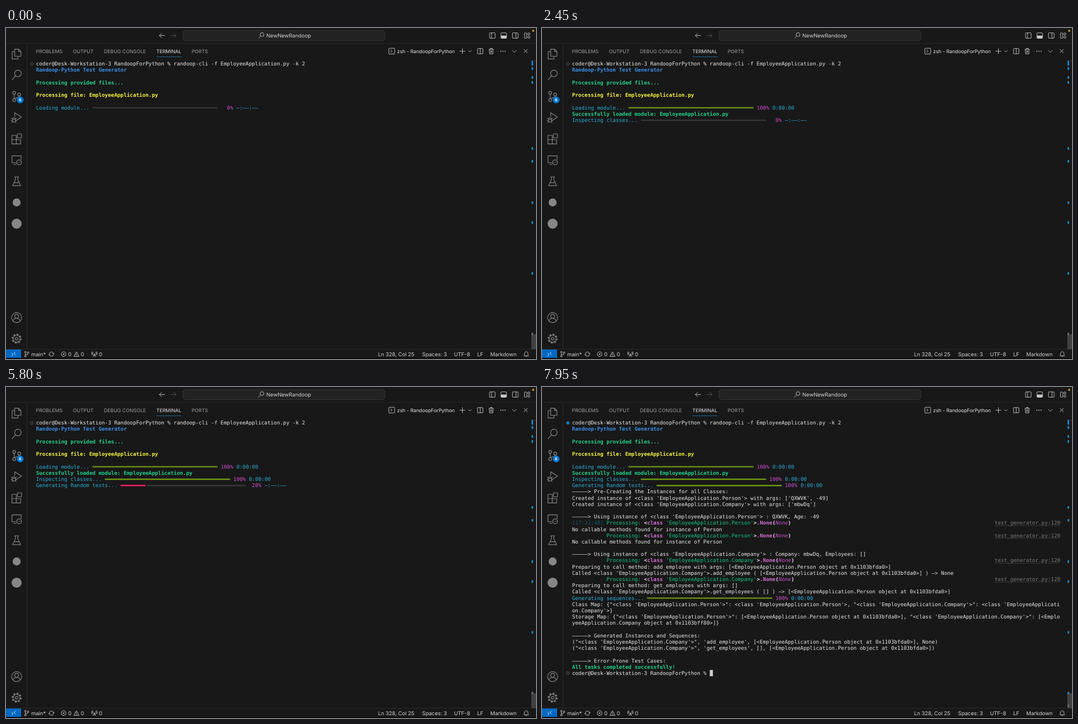
Animation, 947 px wide and 592 px high, one loop 8000 ms. Source, as an HTML page:

```html
<!DOCTYPE html>
<html lang="en">
<head>
<meta charset="utf-8">
<title>Terminal test run</title>
<style>
  html, body { margin: 0; width: 100%; height: 100%; overflow: hidden; background: #181818; }
  svg { display: block; width: 100%; height: 100%; }
  text { white-space: pre; text-rendering: geometricPrecision; }
  .ui { font: 9.45px Inter, "Open Sans", sans-serif; fill: #d4d4d4; }
  .tabs { font-size: 8.77px; fill: #a0a0a0; }
  .tabs .lit { fill: #e7e7e7; }
  .term { font: 9.29px "DejaVu Sans Mono", "Liberation Mono", monospace; fill: #e8e8e8; }
  .icon { fill: none; stroke: #cccccc; stroke-width: .9; stroke-linejoin: round; }
  .side { stroke: #868686; stroke-width: 1.15; }
  .b { font-weight: 700; }
  .blue { fill: #3b8eea; font-weight: 700; }
  .ok { fill: #23d18b; font-weight: 700; }
  .yellow { fill: #f5f543; font-weight: 700; }
  .green { fill: #10c982; }
  .cyan { fill: #2aaedb; }
  .dimcyan { fill: #1b566e; }
  .magenta { fill: #d250d2; }
  .call { fill: #d670d6; font-weight: 700; }
  .none { fill: #cc4ccc; font-style: italic; }
  .link { fill: #7a7a7a; }
</style>
</head>
<body>
<svg id="stage" viewBox="0 0 947 592" preserveAspectRatio="none">
  <rect width="947" height="592" fill="#181818"/>
  <path d="M0 27.5H947M37.5 27V575M0 574.5H947" stroke="#292929" fill="none"/>
  <rect y="575" width="27" height="16" fill="#0069c4"/>
  <rect y="590" width="947" height="2" fill="#0c0c0c"/>

  <!-- title bar -->
  <rect x="316" y="4.5" width="361" height="18" rx="4.5" fill="#222222" stroke="#3b3b3b" stroke-width=".9"/>
  <g class="icon">
    <path d="M284 13.5H274M278.2 9.3L274 13.5L278.2 17.7"/>
    <path d="M294 13.5H304M299.8 9.3L304 13.5L299.8 17.7" stroke="#555555"/>
    <circle cx="457.5" cy="11.8" r="3.4"/><path d="M455 14.3L451 18.4"/>
    <rect x="864" y="8.7" width="10" height="9.6" rx="1"/><path d="M867.6 9V18"/>
    <rect x="884.3" y="8.7" width="10" height="9.6" rx="1"/>
    <rect x="885" y="14" width="8.8" height="4" fill="#cccccc"/>
    <rect x="905" y="8.7" width="10" height="9.6" rx="1"/><path d="M911.2 9V18"/>
    <rect x="926.3" y="9" width="4" height="9.2" rx=".8"/>
    <rect x="932.5" y="9" width="3.4" height="3.4" rx=".6"/>
    <rect x="932.5" y="14.8" width="3.4" height="3.4" rx=".6"/>
  </g>
  <circle cx="942" cy="5" r="2" fill="#b78a26"/>
  <text class="ui" x="465" y="17">NewNewRandoop</text>

  <!-- panel header -->
  <g class="ui tabs">
    <text x="53.6" y="44.8">PROBLEMS</text>
    <text x="119.7" y="44.8">OUTPUT</text>
    <text x="175" y="44.8">DEBUG CONSOLE</text>
    <text x="268.8" y="44.8" class="lit">TERMINAL</text>
    <text x="331.7" y="44.8">PORTS</text>
    <text x="698.8" y="44.8" class="lit">zsh - RandoopForPython</text>
  </g>
  <rect x="268.5" y="51" width="45" height=".8" fill="#1f78b8"/>
  <g class="icon">
    <rect x="684" y="36.2" width="10.4" height="10.4" rx="1"/><path d="M687 38.8L690 41.4L687 44"/>
    <path d="M810.5 41.4H820.5M815.5 36.4V46.4M826 40.2L828.7 42.9L831.4 40.2"/>
    <rect x="842.5" y="36.8" width="9.6" height="9.4" rx=".6"/><path d="M847.3 37V46"/>
    <path d="M862.6 38.2H871.4M865.4 38V36.5H868.6V38M863.6 38.2L864.1 46.3H869.9L870.4 38.2M866 40V44.5M868 40V44.5"/>
    <path d="M904.6 39.8L908.3 43.5L912 39.8M925.4 38L932 44.6M932 38L925.4 44.6"/>
  </g>
  <g fill="#cccccc"><circle cx="884.2" cy="41.5" r=".9"/><circle cx="888" cy="41.5" r=".9"/><circle cx="891.8" cy="41.5" r=".9"/></g>

  <!-- activity bar -->
  <g class="icon side">
    <path d="M15.5 37.8H22.5L26.7 42V50.5H15.5ZM22.3 38V42.2H26.5M15.5 42H11V55.4H21.5V50.6"/>
    <circle cx="21.3" cy="81.3" r="5.9"/><path d="M17 85.6L10.6 92.8"/>
    <circle cx="14.6" cy="116" r="2.6"/><circle cx="14.6" cy="129" r="2.6"/><circle cx="23.6" cy="119" r="2.6"/>
    <path d="M14.6 118.6V126.4M23.6 121.6C23.6 125 20 124.6 16 125.6"/>
    <path d="M15.5 159V151.5L27.5 159.3L18.5 165.2"/>
    <ellipse cx="14.2" cy="164.6" rx="2.9" ry="3.9"/>
    <path d="M11.4 163.5H17M9.4 161L11.6 162.4M19 161L16.8 162.4M9 165.4H11.2M17.2 165.4H19.4M9.8 169L11.8 167.4M18.6 169L16.6 167.4"/>
    <path d="M10.6 192H18.4V207.4H10.6ZM10.6 199.7H26.1V207.4H18.4"/><rect x="20.4" y="189.2" width="7.3" height="7.3" rx=".7"/>
    <path d="M18.5 241H10.6V228.6H27V235.4M13.6 244H18.6"/><circle cx="23.4" cy="240.2" r="4.4"/>
    <path d="M21.2 239L22.6 240.4L21.2 241.8M25.6 238.6L24.2 240L25.6 241.4" stroke-width=".8"/>
    <path d="M14.8 266.2H23.2M16.7 266.4V272L11.8 281.8H26.2L21.3 272V266.4M14.4 276.6H23.6"/>
    <circle cx="19" cy="518" r="8.9"/><circle cx="19" cy="515.6" r="3.5"/><path d="M12.8 524.2C13.5 517.9 24.5 517.9 25.2 524.2"/>
    <circle cx="19" cy="555.7" r="7.6" stroke-width="2.5" stroke-dasharray="2.985"/>
    <circle cx="19" cy="555.7" r="6.2"/><circle cx="19" cy="555.7" r="2.4"/>
  </g>
  <circle cx="19" cy="312" r="7.2" fill="#868686"/>
  <circle cx="19" cy="350" r="9" fill="#868686"/>
  <circle cx="25.3" cy="128.7" r="6.1" fill="#0078d4"/>
  <text class="ui b" x="25.3" y="131.4" text-anchor="middle" style="font-size:7px;fill:#fff">6</text>

  <!-- status bar -->
  <g class="icon">
    <path d="M10 581.6L12.6 584.2L10 586.8M16.8 579.4L14.2 582L16.8 584.6" stroke="#ffffff"/>
    <circle cx="34.6" cy="579.6" r="1.4"/><circle cx="34.6" cy="587" r="1.4"/><circle cx="39.4" cy="580.8" r="1.4"/>
    <path d="M34.6 581V585.6M39.4 582.2C39.4 584.4 36.5 583.6 34.8 584.6"/>
    <path d="M77.4 583.5A3.9 3.9 0 0 1 84.8 581.6M85 583.1A3.9 3.9 0 0 1 77.7 585.2M83 582.2H86.6M75.8 584.4H79.2"/>
    <circle cx="103" cy="583.3" r="4.2"/><path d="M101.3 581.6L104.7 585M104.7 581.6L101.3 585"/>
    <path d="M125.8 579L130.3 587.3H121.3ZM125.8 582V584.6M125.8 585.4V586.3"/>
    <path d="M158 582.5L155.7 588M158 582.5L160.3 588M156.6 586H159.4M155.6 579.5Q154.2 581.8 155.6 584M160.4 579.5Q161.8 581.8 160.4 584M154 578.6Q151.8 581.8 154 585M162 578.6Q164.2 581.8 162 585"/>
    <path d="M925.6 586.3H933.6L932.6 584.4V582C932.6 578 926.6 578 926.6 582V584.4ZM928.4 587.4Q929.6 588.6 930.8 587.4"/>
  </g>
  <g class="ui">
    <text x="45" y="586.7">main*</text><text x="111" y="586.7">0</text>
    <text x="133.6" y="586.7">0</text><text x="166" y="586.7">0</text>
    <text x="664.7" y="586.7">Ln 328, Col 25</text><text x="743.6" y="586.7">Spaces: 3</text>
    <text x="800.4" y="586.7">UTF-8</text><text x="842" y="586.7">LF</text><text x="865.2" y="586.7">Markdown</text>
  </g>

  <!-- scroll ruler -->
  <rect x="938.7" y="547.5" width="8.3" height="27" fill="#414141"/>
  <g id="ruler"></g>
  <rect x="944" y="58.6" width="3" height="1.2" fill="#6e2a2a"/>

  <circle id="status" cx="46.2" cy="64.2" r="2.5" stroke-width=".9"/>
  <g id="term" class="term"></g>
</svg>
<script>
const LOOP = 8000;
const STEP = 505;      // work time of one fifth of a bar
const LAG = 110;       // delay until the next screen refresh shows it
const FIRST = -290, RUN = 2540;
const PRINT = FIRST + 3 * RUN, DONE = PRINT + 120;
const LEFT = 53.7, COL = 5.593, TOP = 64.1, ROW = 11.19;
const PENDING = "#626262", PASSED = "#1a7fbd";
const term = document.getElementById("term");
const statusDot = document.getElementById("status");
const timed = [], bars = [];

const colX = col => LEFT + col * COL;
const rowY = row => TOP + row * ROW;

function make(tag, attrs, parent, text = "") {
  const el = document.createElementNS("http://www.w3.org/2000/svg", tag);
  for (const name in attrs) el.setAttribute(name, attrs[name]);
  el.textContent = text;
  return parent.appendChild(el);
}

function put(parent, row, col, text, style = "") {
  return make("text", { x: colX(col), y: rowY(row) + 3.2, class: style }, parent, text);
}

function group(at) {
  const el = make("g", {}, term);
  timed.push({ el, at });
  return el;
}

// Parts are plain strings or [style, string] pairs, laid out on the character grid.
function line(at, row, ...parts) {
  const g = group(at);
  let col = 0;
  for (const part of parts) {
    const [style, text] = Array.isArray(part) ? part : ["", part];
    put(g, row, col, text, style);
    col += text.length;
  }
  return g;
}

function stroke(parent, color, width) {
  return make("path", { stroke: color, "stroke-width": width, fill: "none" }, parent);
}

function bar(start, row, label, duration = RUN) {
  const g = line(start, row, ["cyan", label]);
  const col = label.length + 1;
  bars.push({
    start, row, col, duration,
    rest: stroke(g, "#373737", 2.4),
    fill: stroke(g, "#e91e63", 2.7),
    percent: put(g, row, col + 41, "", "magenta"),
    eta: put(g, row, col + 46, "", "cyan")
  });
}

function call(row, type, stamp = "           ") {
  const g = line(PRINT, row, ["dimcyan", stamp], ["green", "Processing: "], ["b", "<"], ["call", "class"], " ",
    ["green", `'EmployeeApplication.${type}'`], ["b", ">"], ["call", ".None"], ["b", "("],
    ["none", "None"], ["b", ")"]);
  put(g, row, 135, "test_generator.py:120", "link");
  const y = rowY(row) + 5;
  make("path", { d: `M${colX(135)} ${y}H${colX(156)}`, stroke: "#5c5c5c", "stroke-width": .8,
    "stroke-dasharray": "1.6 1.2" }, g);
}

const prompt = "coder@Desk-Workstation-3 RandoopForPython % ";
const file = "EmployeeApplication.py";
const person = "<class 'EmployeeApplication.Person'>";
const company = "<class 'EmployeeApplication.Company'>";
const object = "[<EmployeeApplication.Person object at 0x1103bfda0>]";
const arrow = "–––––>";   // wide dashes join up in this typeface

line(0, 0, prompt + `randoop-cli -f ${file} -k 2`);
line(0, 1, ["blue", "Randoop-Python Test Generator"]);
line(0, 3, ["ok", "Processing provided files..."]);
line(0, 5, ["yellow", `Processing file: ${file}`]);
bar(FIRST, 7, "Loading module...");
line(FIRST + RUN, 8, ["ok", `Successfully loaded module: ${file}`]);
bar(FIRST + RUN, 9, "Inspecting classes...");
bar(FIRST + 2 * RUN, 10, "Generating Random tests...");

const output = {
  11: `${arrow} Pre-Creating the Instances for all Classes:`,
  12: `Created instance of ${person} with args: ['QXWVK', -49]`,
  13: `Created instance of ${company} with args: ['mbwDq']`,
  15: `${arrow} Using instance of ${person} : QXWVK, Age: -49`,
  17: "No callable methods found for instance of Person",
  19: "No callable methods found for instance of Person",
  21: `${arrow} Using instance of ${company} : Company: mbwDq, Employees: []`,
  23: `Preparing to call method: add_employee with args: ${object}`,
  24: `Called ${company}.add_employee ( ${object} ) –> None`,
  26: "Preparing to call method: get_employees with args: []",
  27: `Called ${company}.get_employees ( [] ) –> ${object}`,
  29: `Class Map: {"${person}": ${person}, "${company}": <class 'EmployeeApplicati`,
  30: "on.Company'>}",
  31: `Storage Map: {"${person}": ${object}, "${company}": [<Emplo`,
  32: "yeeApplication.Company object at 0x1103bff80>]}",
  34: `${arrow} Generated Instances and Sequences:`,
  35: `("${company}", 'add_employee', ${object}, None)`,
  36: `("${company}", 'get_employees', [], ${object})`,
  38: `${arrow} Error-Prone Test Cases:`
};
for (const row in output) line(PRINT, row, output[row]);
call(16, "Person", "[17:22:48] ");
call(18, "Person");
call(22, "Company");
call(25, "Company");
bar(PRINT, 28, "Generating sequences...", 0);
line(PRINT, 39, ["ok", "All tasks completed successfully!"]);

const last = line(DONE, 40, prompt);
make("rect", { x: colX(44), y: rowY(40) - 5.6, width: COL, height: 11.2, fill: "#cccccc" }, last);
make("circle", { cx: 46.2, cy: rowY(40), r: 2.5, fill: "none", stroke: PENDING, "stroke-width": .9 }, last);

const ruler = document.getElementById("ruler");
const mark = (y, fill, parent = ruler) => make("rect", { x: 939, y, width: 3, height: 4.8, fill }, parent);
for (const y of [58.5, 62.5, 70, 86, 95, 213, 236, 310, 345.5, 436.5]) mark(y, PASSED);
const runMark = mark(545, PENDING);
mark(567.5, PENDING, last);

const eta = ["–:––:––", "–:––:––", "0:00:02", "0:00:02", "0:00:01", "0:00:00"];

function stepsDone({ start, duration }, t) {
  const age = t - start;
  if (age >= duration) return 5;
  return Math.max(0, Math.min(4, Math.floor((age - LAG) / STEP)));
}

function drawBar(b, t) {
  const done = stepsDone(b, t);
  const y = rowY(b.row) + .2, edge = b.col + done * 8;
  b.fill.setAttribute("d", done ? `M${colX(b.col)} ${y}H${colX(edge)}` : "");
  b.fill.setAttribute("stroke", done === 5 ? "#6f9813" : "#e91e63");
  b.fill.setAttribute("stroke-width", done === 5 ? 2.4 : 2.7);
  b.rest.setAttribute("d", done < 5 ? `M${colX(edge + (done ? .5 : 0))} ${y}H${colX(b.col + 40)}` : "");
  b.percent.textContent = `${done * 20}%`.padStart(4);
  b.eta.textContent = eta[done];
}

function render(t) {
  for (const { el, at } of timed) el.style.display = t >= at ? "" : "none";
  for (const b of bars) if (t >= b.start) drawBar(b, t);
  const color = t >= DONE ? PASSED : PENDING;
  statusDot.setAttribute("fill", t >= DONE ? color : "none");
  statusDot.setAttribute("stroke", color);
  runMark.setAttribute("fill", color);
}

function frame() {
  render(performance.now() % LOOP);
  requestAnimationFrame(frame);
}
frame();
</script>
</body>
</html>
```
